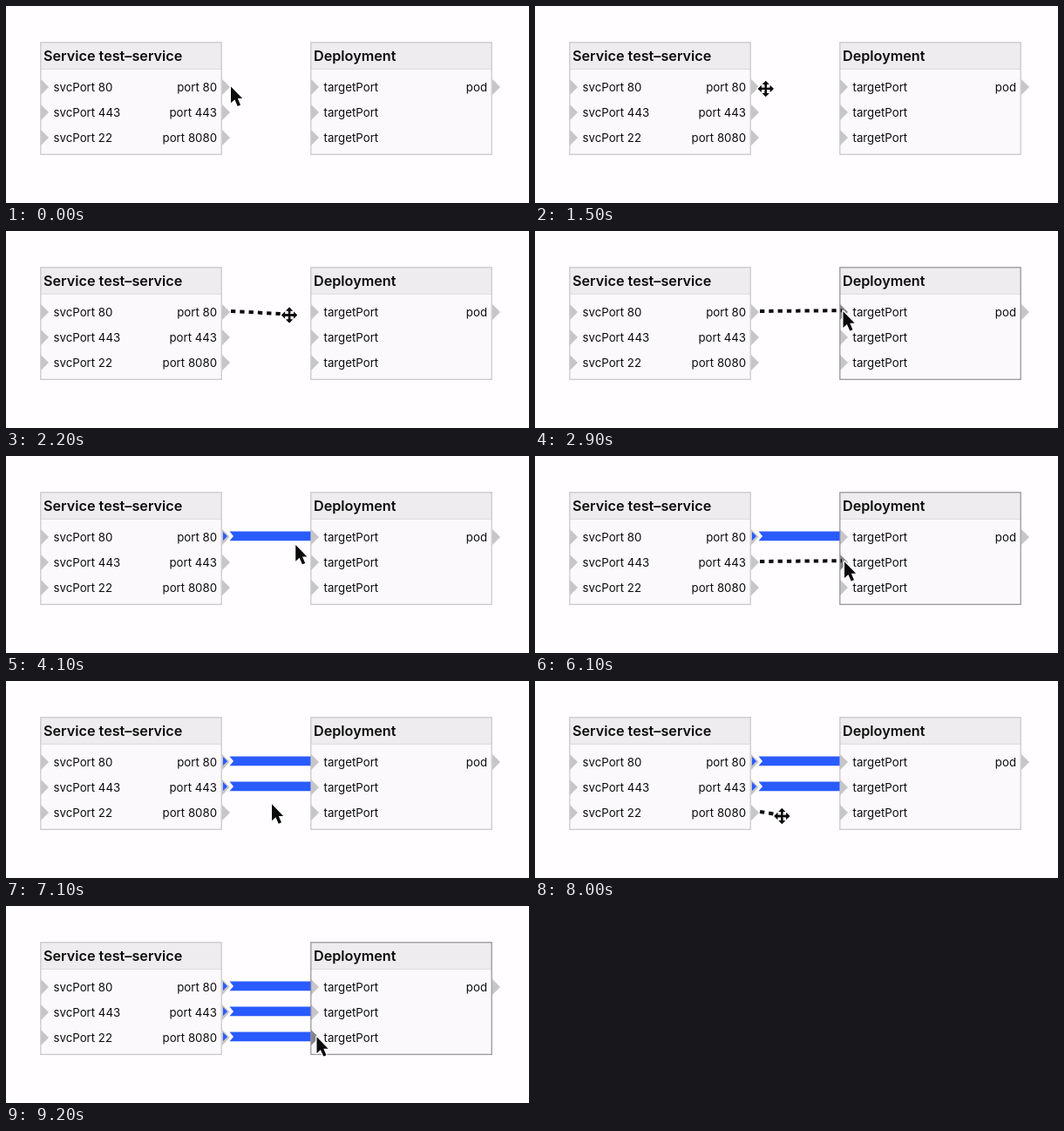
An HTML page for the animation above (10 s loop, 600 by 226 pixels).

```html
<!DOCTYPE html>
<html lang="en">
<head>
<meta charset="utf-8">
<title>Port wiring</title>
<style>
  html, body { margin: 0; width: 100%; height: 100%; overflow: hidden; background: #fffdff; }
  svg { display: block; width: 600px; height: 226px; font: 13.25px Inter, sans-serif; fill: #0c0c0c; }
  .title { font-size: 16.2px; font-weight: 600; }
  .box { fill: #fbf9fc; }
  .head { fill: #eeecee; }
  .rule { stroke: #d8d6d9; }
  .frame { fill: none; stroke: #cbc9cc; stroke-width: 1.3; }
  .port { fill: #c6c5c7; }
  .node.hover .frame { stroke: #99989b; }
  .port.hover { fill: #858487; }
  .end { text-anchor: end; }
  .blue { fill: #2a5bff; }
  .gap { fill: #fffdff; }
  .wire { stroke: #0c0c0c; stroke-width: 4; stroke-dasharray: 5.3 5; }
  .cursor { fill: #0a0a0a; stroke: #fff; stroke-width: 2.6; stroke-linejoin: round; paint-order: stroke; }
</style>
</head>
<body>
<svg id="stage" viewBox="0 0 600 226"></svg>
<script>
const LOOP = 10000, STEP = 100;
const rowY = i => 93 + 29 * i;
const stage = document.getElementById('stage');

function add(parent, tag, attrs, text) {
  const el = document.createElementNS('http://www.w3.org/2000/svg', tag);
  for (const k in attrs) el.setAttribute(k, attrs[k]);
  if (text) el.textContent = text;
  parent.append(el);
  return el;
}

const port = (g, x, y) => add(g, 'path', { class: 'port', d: `M${x} ${y - 9}l9 9-9 9z` });

function node(x, title, left, right) {
  const g = add(stage, 'g', { class: 'node' });
  const size = { x: x + .8, y: 41.8, width: 207.4, height: 128.5 };
  add(g, 'rect', { class: 'box', ...size });
  add(g, 'rect', { class: 'head', ...size, height: 30 });
  add(g, 'path', { class: 'rule', d: `M${x + 1} 72.3h207` });
  add(g, 'text', { class: 'title', x: x + 4, y: 63.3 }, title);
  const ins = left.map((label, i) => {
    add(g, 'text', { x: x + 15.5, y: rowY(i) + 5 }, label);
    return port(g, x + 1, rowY(i));
  });
  const outs = right.map((label, i) => {
    add(g, 'text', { class: 'end', x: x + 203, y: rowY(i) + 5 }, label);
    return port(g, x + 209, rowY(i));
  });
  add(g, 'rect', { class: 'frame', ...size });
  return { g, ins, outs };
}

function link(y) {
  const g = add(stage, 'g', {});
  add(g, 'path', { class: 'gap', d: `M252 ${y - 6}h5l5 6-5 6h-5l5-6z` });
  add(g, 'path', { class: 'blue', d: `M256.5 ${y - 5.4}H349.5v10.8H256.5l4.5-5.4z` });
  add(g, 'path', { class: 'blue', d: `M249 ${y - 5}l5 5-5 5z` });
  return g;
}

const service = node(39, 'Service test–service',
  ['svcPort 80', 'svcPort 443', 'svcPort 22'], ['port 80', 'port 443', 'port 8080']);
const deploy = node(349, 'Deployment', Array(3).fill('targetPort'), ['pod']);
const links = [0, 1, 2].map(i => link(rowY(i) - 1.1));
const wire = add(stage, 'line', { class: 'wire', x1: 258 });
const arrow = add(stage, 'path', { class: 'cursor',
  d: 'M0 0V18.8L4.4 14.8 7.7 22.4 11 21 7.8 13.6H13.2Z' });
const move = add(stage, 'g', { class: 'cursor' });
for (const pass of ['stroke-width:3', 'stroke:none'])
  for (let a = 0; a < 360; a += 90)
    add(move, 'path', { d: 'M-1.2 0V-5H-3.9L0-9 3.9-5H1.2V0z', transform: `rotate(${a})`, style: pass });

// One drag per port row, in ms
const drags = [
  { start: 1500, end: 2700, join: 3400 },
  { start: 5400, end: 6100, join: 6500 },
  { start: 7900, end: 8700, join: 9000 }
];

const progress = (t, a, b) => Math.min(1, Math.max(0, (t - a) / (b - a)));
const smooth = k => k * k * (3 - 2 * k);
const easeOut = k => 1 - (1 - k) ** 1.3;

// Glides to each source port, then drags to its target, sagging on the way
function pointer(t) {
  let x = 258, y = 92.5, free = 100;
  const glide = (toX, toY, k) => {
    x += (toX - x) * k;
    y += (toY - y) * k + 5 * Math.sin(Math.PI * k);
  };
  drags.forEach((d, i) => {
    if (t < free) return;
    glide(255, rowY(i) + .5, smooth(progress(t, free, d.start - 600)));
    glide(353.5 + 1.5 * i, rowY(i) - .8, easeOut(progress(t, d.start - 100, d.end)));
    free = d.join + 400;
  });
  return { x, y };
}

const show = (el, on) => el.setAttribute('visibility', on ? 'visible' : 'hidden');

function draw(now) {
  const t = Math.floor(now % LOOP / STEP) * STEP;
  const { x, y } = pointer(t);
  const started = drags.filter(d => t >= d.start).length;
  const row = started - 1;
  const wiring = started > 0 && t < drags[row].join;
  const onSource = !wiring && x < 257, onTarget = x > 349.5;
  const dragging = wiring && !onTarget;

  drags.forEach((d, i) => {
    service.outs[i].classList.toggle('hover', onSource && i === started);
    deploy.ins[i].classList.toggle('hover', onTarget && i === row);
    show(links[i], t >= d.join);
  });
  service.g.classList.toggle('hover', onSource);
  deploy.g.classList.toggle('hover', onTarget);

  show(wire, wiring);
  if (wiring) {
    wire.setAttribute('y1', rowY(row) - 1);
    wire.setAttribute('x2', Math.min(x, 352));
    wire.setAttribute('y2', y - 1);
  }
  for (const el of [arrow, move]) el.setAttribute('transform', `translate(${x} ${y})`);
  show(arrow, !dragging);
  show(move, dragging);
  requestAnimationFrame(draw);
}
draw(0);
</script>
</body>
</html>
```
